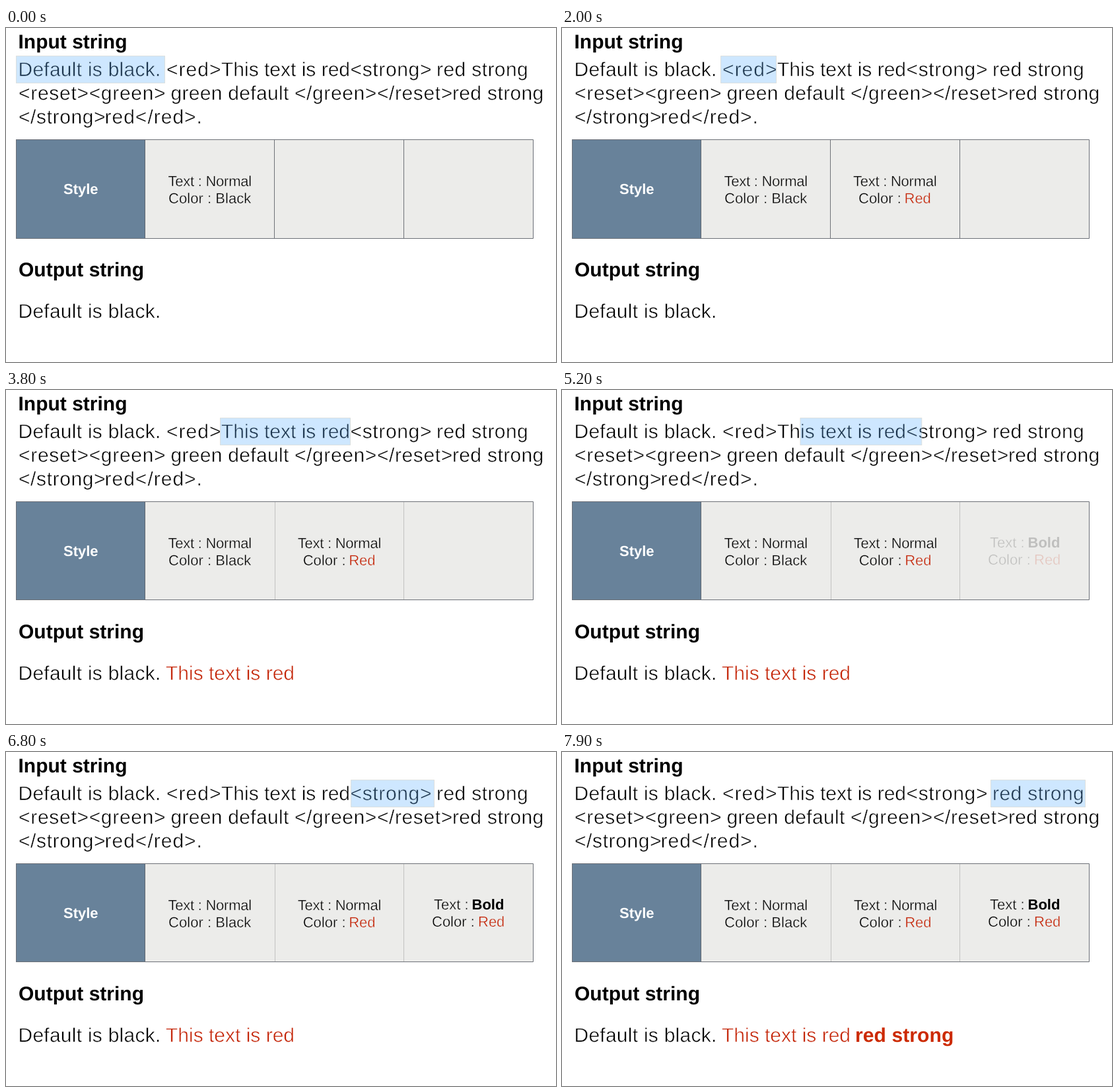
Write an HTML page that moves like this. It is 833x507 px and loops after 8000 ms.

```html
<!DOCTYPE html>
<html lang="en">
<head>
<meta charset="utf-8">
<title>Style stack</title>
<style>
html, body { margin: 0; width: 100%; height: 100%; overflow: hidden; background: #fff; }
svg { display: block; }
text { font: 30px "Liberation Sans", Arial, sans-serif; white-space: pre; text-rendering: geometricPrecision; }
/* A stroke in the background colour thins the glyphs to a light weight. */
.light { stroke: #fff; stroke-width: .02em; }
.cell { font-size: 22px; }
.cell.light { stroke: #ececea; }
.bold { font-weight: bold; }
.red { fill: #c42407; }
</style>
</head>
<body>
<svg id="stage" width="833" height="507" viewBox="0 0 833 507"></svg>
<script>
const stage = document.getElementById('stage');

const text = (x, y, s, cls = 'light', spacing = 0, fill = '') =>
  `<text x="${x}" y="${y}" class="${cls}" letter-spacing="${spacing}"${fill && ` fill="${fill}"`}>` +
  s.replace(/</g, '&lt;').replace(/>/g, '&gt;') + '</text>';
const line = (x1, y1, x2, y2, color) =>
  `<path d="M${x1} ${y1}L${x2} ${y2}" stroke="${color}"/>`;
const group = (id, content) => `<g id="${id}" opacity="0">${content}</g>`;
const small = 'cell light';

// Fill, frame and column lines of the style table.
const table = (bottom, columns, color) =>
  `<path d="M15 169H799V${bottom}H15Z" fill="#ececea"/>` +
  `<path d="M15 169H211V${bottom}H15Z" fill="#68829a"/>` +
  columns.map(x => line(x, 170, x, bottom - 1, color)).join('') +
  line(210.5, 169, 210.5, bottom, '#5f6770') +
  `<path d="M15.5 169.5H798.5V${bottom - .5}H15.5Z" fill="none" stroke="#6c7077"/>`;

stage.innerHTML =
  text(18.5, 31, 'Input string', 'bold') +
  text(18.5, 72.5, 'Default is black.', 'light', .25) +
  text(243, 72.5, '<red>', 'light', 1) +
  text(326, 72.5, 'This text is red') +
  text(521.5, 72.5, '<strong>', 'light', .65) +
  text(652, 72.5, 'red strong', 'light', .4) +
  text(19, 108.5, '<reset><green>', 'light', .7) +
  text(249.5, 108.5, 'green default', 'light', .3) +
  text(437, 108.5, '</green></reset>', 'light', .6) +
  text(676, 108.5, 'red strong', 'light', .35) +
  text(19, 144.5, '</strong>', 'light', .6) +
  text(149.5, 144.5, 'red</red>.', 'light', 1) +

  table(320, [406.5, 602.5], '#707378') +
  group('paleTable',
    '<path d="M15 319H799V320H15Z" fill="#fff"/>' + table(319, [407.5, 602.5], '#c2c2c1')) +
  text(87, 252, 'Style', 'cell bold', 0, '#fff') +
  text(245.5, 240, 'Text : Normal', small, -.25) +
  text(246, 266, 'Color : Black', small, .05) +
  group('redStyle',
    text(441, 240, 'Text : Normal', small, -.25) +
    text(449, 266, 'Color :', small) +
    text(518.5, 266, 'Red', small + ' red')) +
  group('boldStyle',
    text(648, 239, 'Text :', small) +
    text(705.5, 239, 'Bold', 'cell bold') +
    text(645, 265, 'Color :', small) +
    text(715, 265, 'Red', small + ' red')) +

  text(19, 376.5, 'Output string', 'bold') +
  text(18.5, 439.5, 'Default is black.', 'light', .25) +
  group('redOutput', text(242, 439.5, 'This text is red', 'light red')) +
  group('boldOutput', text(444, 439.5, 'red strong', 'bold', .1, '#cc2a00')) +
  '<rect id="marker" y="42.5" height="41" fill="#5fafff" fill-opacity=".3" stroke="#d6d6cc" stroke-opacity=".65"/>';

const part = id => document.getElementById(id);
const fade = (id, opacity) => part(id).setAttribute('opacity', opacity);

const LOOP = 8000, MOVE = 500;
const starts = [1015, 3300, 5060, 7130];
const spans = [[15, 241], [240, 325], [324, 522], [522, 649], [649, 793]];

function progress(t, start) {
  const u = Math.min(1, Math.max(0, (t - start) / MOVE));
  return (1 - Math.cos(Math.PI * u)) / 2;
}

function draw(now) {
  const t = now % LOOP;
  const p = starts.map(s => progress(t, s));
  const [left, right] = [0, 1].map(side =>
    p.reduce((x, k, i) => x + k * (spans[i + 1][side] - spans[i][side]), spans[0][side]));

  part('marker').setAttribute('x', left + .5);
  part('marker').setAttribute('width', right - left - 1);
  fade('redStyle', p[0]);
  part('redStyle').setAttribute('transform', `translate(${p[1] * .7} 0)`);
  fade('paleTable', p[1]);
  fade('redOutput', p[1]);
  fade('boldStyle', p[2]);
  fade('boldOutput', p[3]);
  requestAnimationFrame(draw);
}
draw(0);
</script>
</body>
</html>
```
